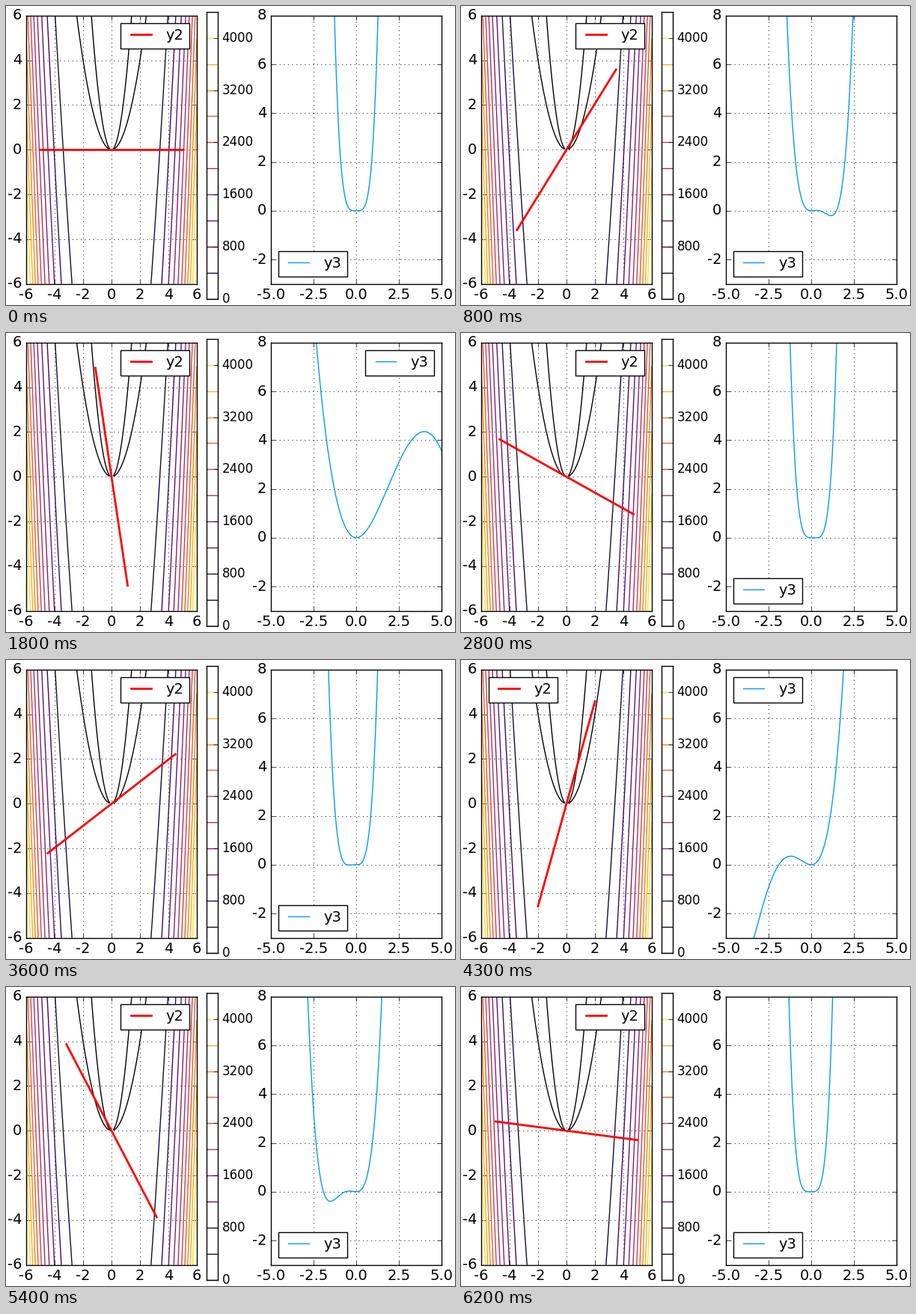
A matplotlib script that plays this animation: 600x400 px, repeating every 6300 ms.

```python
import numpy as np
import matplotlib.pyplot as plt
from matplotlib.animation import FuncAnimation

W, H, DPI = 600, 400, 100
FRAMES, INTERVAL = 63, 100
REACH = 5

plt.style.use("classic")
plt.rcParams.update({
    "figure.facecolor": "white",
    "savefig.facecolor": "white",
    "savefig.dpi": DPI,
    "font.family": "DejaVu Sans",
    "axes.unicode_minus": False,
    "axes.axisbelow": True,
})


def surface(x, y):
    return (y - x**2) * (y - 3 * x**2)


def add_axes(fig, left, bottom, right, top):
    """Axes placed by pixel edges, measured from the lower left."""
    return fig.add_axes([left / W, bottom / H,
                         (right - left) / W, (top - bottom) / H])


def style_axes(ax, xlim, ylim, xticks, yticks, xformat):
    ax.set_xlim(*xlim)
    ax.set_ylim(*ylim)
    ax.set_xticks(xticks, [xformat % v for v in xticks])
    ax.set_yticks(yticks, ["%d" % v for v in yticks])
    ax.tick_params(labelsize=14)
    ax.grid(True)


fig = plt.figure(figsize=(W / DPI, H / DPI), dpi=DPI)

# Contour map of the surface with a rotating section line
left = add_axes(fig, 27, 28.2, 255, 387.2)
grid = np.linspace(-6, 6, 241)
X, Y = np.meshgrid(grid, grid)
levels = np.arange(0, 4401, 400)
cmap = plt.get_cmap("inferno")
left.contour(X, Y, surface(X, Y), levels=levels, cmap=cmap,
             linewidths=1, zorder=1)
style_axes(left, (-6, 6), (-6, 6),
           range(-6, 7, 2), range(-6, 7, 2), "%d")
section, = left.plot([], [], color="red", lw=2, label="y2")

# Level scale, its ticks drawn over the coloured lines
scale = add_axes(fig, 268, 8.2, 283, 392.2)
scale.set_axisbelow(False)
scale.set_xlim(0, 1)
scale.set_ylim(0, levels[-1])
scale.hlines(levels, 0, 1, colors=cmap(levels / levels[-1]), linewidths=1)
scale.set_xticks([])
scale.yaxis.set_ticks_position("right")
scale.set_yticks(levels[::2])
scale.tick_params(labelsize=12)

# Height profile along the section line
right = add_axes(fig, 354, 28.2, 582, 387.2)
style_axes(right, (-5, 5), (-3, 8),
           np.arange(-5, 5.1, 2.5), range(-2, 9, 2), "%.1f")
profile, = right.plot([], [], color="#009afa", lw=1, label="y3")

for ax in (left, right):
    ax.legend(loc="best", fontsize=14, handletextpad=0.7)

t = np.linspace(-REACH, REACH, 401)


def update(i):
    angle = 0.1 * i
    x, y = t * np.cos(angle), t * np.sin(angle)
    section.set_data(x[[0, -1]], y[[0, -1]])
    profile.set_data(t, surface(x, y))
    return section, profile


anim = FuncAnimation(fig, update, frames=FRAMES, interval=INTERVAL,
                     repeat=True, repeat_delay=0, blit=False)
plt.show()
```
